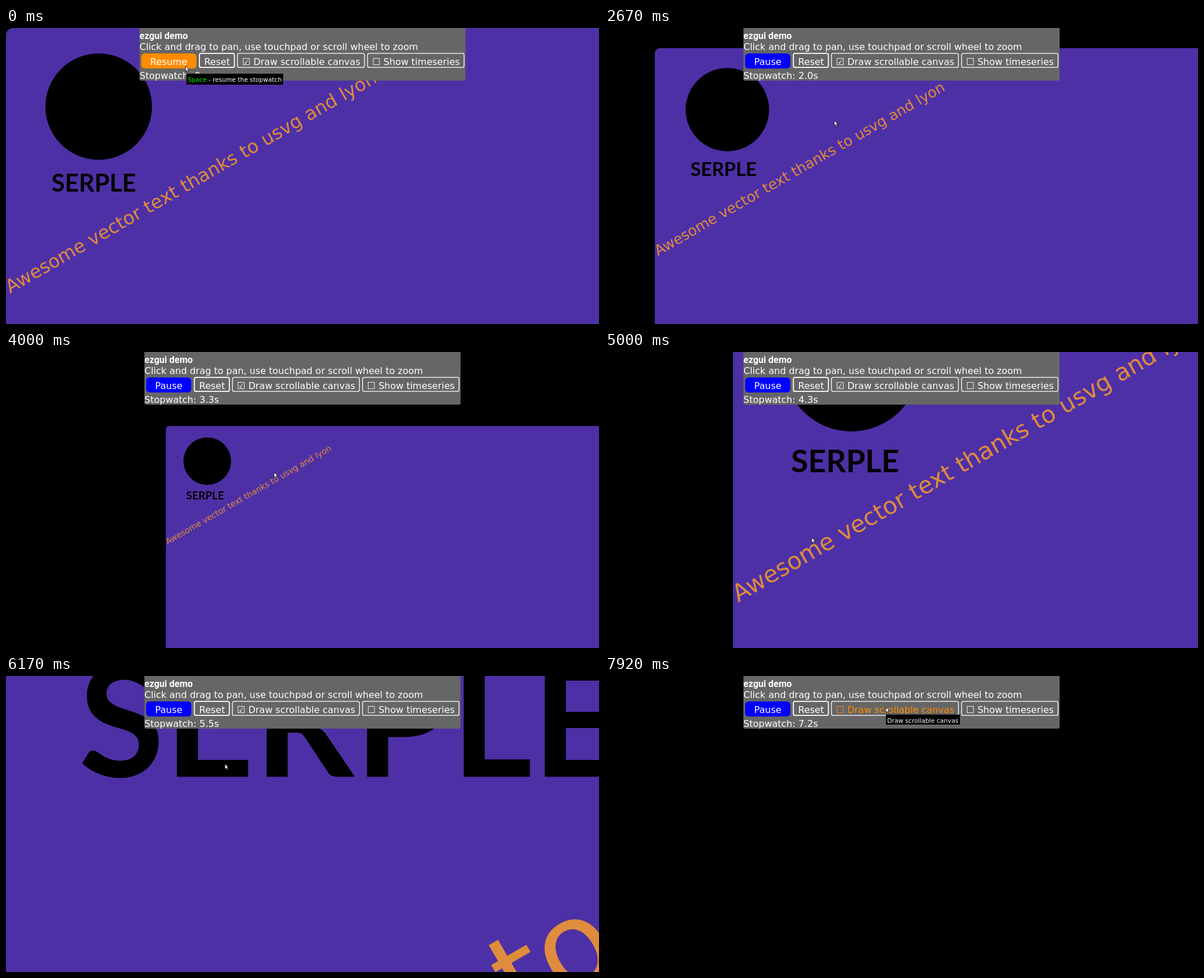
An HTML page with a canvas that plays this animation: 1024x512 px, repeating every 8000 ms.

```html
<!DOCTYPE html>
<html>
<head>
<meta charset="utf-8">
<style>
html, body { margin: 0; height: 100%; overflow: hidden; background: #000; }
canvas { display: block; }
</style>
</head>
<body>
<canvas id="stage" width="1024" height="512"></canvas>
<script>
const ctx = document.getElementById('stage').getContext('2d');
const LOOP = 8000, FRAME = 1000 / 12;
const SANS = '"DejaVu Sans", sans-serif', ORANGE = '#ff8c00';

// time, scale, left, top of the scrollable canvas
const VIEW = [
  [2417, 1, 0, 0], [3000, .5645, 172.5, 69.7], [3250, .545, 180, 72.8],
  [3417, .545, 180, 72.8], [3750, .447, 219, 88.5], [3833, .447, 219, 88.5],
  [4000, .447, 276, 128], [4167, .447, 309.4, 155], [4833, .447, 309.4, 155],
  [5000, 1.278, 221, -154], [5250, 1.834, 162, -360], [5833, 1.834, 162, -360],
  [6166, 6.42, -378.5, -1644]
];
// time, x, y of the pointer tip
const POINTER = [
  [833, 310, 66], [1330, 407, 148], [1583, 396, 160], [3750, 396, 160],
  [3833, 406, 169], [4000, 463, 208], [4167, 496, 235], [4750, 357, 321],
  [5330, 357, 321], [5667, 378, 167], [5750, 378, 152], [6417, 378, 152],
  [6750, 362, 60], [7170, 485, 54]
];

const mix = (a, b, p) => a + (b - a) * p;

function segment(keys, t) {
  const i = keys.findIndex(k => k[0] > t);
  if (i < 0) return [keys.at(-1), keys.at(-1), 0];
  if (i === 0) return [keys[0], keys[0], 0];
  const a = keys[i - 1], b = keys[i];
  return [a, b, (t - a[0]) / (b[0] - a[0])];
}

// Geometric zoom; the offset is linear in scale, so the zoom centre stays put.
function viewAt(t) {
  const [a, b, p] = segment(VIEW, t);
  const scale = a[1] * (b[1] / a[1]) ** p;
  const q = a[1] === b[1] ? p : (scale - a[1]) / (b[1] - a[1]);
  return [scale, mix(a[2], b[2], q), mix(a[3], b[3], q)];
}

function pointerAt(t) {
  const [a, b, p] = segment(POINTER, t);
  return [mix(a[1], b[1], p), mix(a[2], b[2], p)];
}

function text(str, x, y, color = '#fff', font = '16px ' + SANS) {
  ctx.font = font;
  ctx.fillStyle = color;
  ctx.fillText(str, x, y);
  return x + ctx.measureText(str).width;
}

function box(x, y, w, h, r, fill, line) {
  ctx.beginPath();
  ctx.roundRect(x, y, w, h, r);
  if (fill) { ctx.fillStyle = fill; ctx.fill(); }
  if (line) { ctx.strokeStyle = '#fff'; ctx.lineWidth = line; ctx.stroke(); }
}

function drawCanvas(t) {
  const [scale, left, top] = viewAt(t);
  ctx.save();
  ctx.translate(left, top);
  ctx.scale(scale, scale);
  box(0, 0, 5000, 5000, 12, '#4e30a6');
  ctx.fillStyle = '#000';
  ctx.beginPath();
  ctx.arc(160, 136, 92, 0, 7);
  ctx.fill();
  text('SERPLE', 78.5, 283.2, '#000', 'bold 42px Lato, sans-serif');
  ctx.translate(7, 459.5);
  ctx.rotate(-Math.PI / 6);
  text('Awesome vector text thanks to usvg and lyon', 0, 0, '#df8c3d', '32px ' + SANS);
  ctx.restore();
}

function drawPanel(t, [px, py], running, checked) {
  const left = running ? 239 : 230.5, shift = running ? 0 : 8.7;
  const over = (x, w) => running && t > 6400 && py < 69 && px >= x && px < x + w;
  const outlined = (label, x, w, labelX, line) => {
    box(x + shift, 43.8, w, 24.4, 3, null, line);
    text(label, labelX + shift, 63.5, over(x, w) ? ORANGE : '#fff');
  };
  box(left, -4, 1024 - 2 * left, 95, 3, '#666');
  text('ezgui demo', left, 19, '#fff', 'bold 16px Roboto, sans-serif');
  text('Click and drag to pan, use touchpad or scroll wheel to zoom', left, 38);
  box(left + 3, 44, running ? 78 : 95.5, 26, 6, running ? '#00f' : ORANGE);
  text(running ? 'Pause' : 'Resume', left + 18.5, 64.3);
  outlined('Reset', 325.3, 60.4, 333.5, 1.8);
  outlined((checked ? '☑' : '☐') + ' Draw scrollable canvas', 391, 219.3, 399, 1.3);
  outlined('☐ Show timeseries', 615.7, 166.6, 623.7, 1.3);
  const seconds = Math.max(0, (t - 716) / 1000).toFixed(1);
  text(`Stopwatch: ${running ? seconds : 0}s`, left, 88);
}

function drawTooltip(parts, x, y, w, h) {
  box(x, y, w, h, 0, '#000');
  let pen = x + 2.3;
  for (const [str, color] of parts) pen = text(str, pen, y + 14.2, color, '10.67px ' + SANS);
}

function drawPointer([x, y]) {
  ctx.beginPath();
  [[0, 0], [0, 9], [2, 7.2], [3.4, 10.8], [5, 10], [3.6, 6.6], [6.2, 6.4]]
    .forEach(([dx, dy]) => ctx.lineTo(x + dx, y + dy));
  ctx.closePath();
  ctx.fillStyle = '#fff';
  ctx.strokeStyle = '#000';
  ctx.lineWidth = .8;
  ctx.fill();
  ctx.stroke();
}

function draw(now) {
  const t = Math.floor((now % LOOP) / FRAME + .05) * FRAME;
  const running = t >= 745, checked = t < 7580, pointer = pointerAt(t);
  ctx.fillStyle = '#000';
  ctx.fillRect(0, 0, 1024, 512);
  if (checked) drawCanvas(t);
  drawPanel(t, pointer, running, checked);
  if (t < 80 || (t > 660 && !running))
    drawTooltip([['Space', '#0f0'], [' - resume the stopwatch', '#fff']], 311.5, 79, 167, 19);
  if (t > 7330) drawTooltip([['Draw scrollable canvas', '#fff']], 485, 66.8, 128, 17.2);
  drawPointer(pointer);
  requestAnimationFrame(() => draw(performance.now()));
}
draw(0);
</script>
</body>
</html>
```
